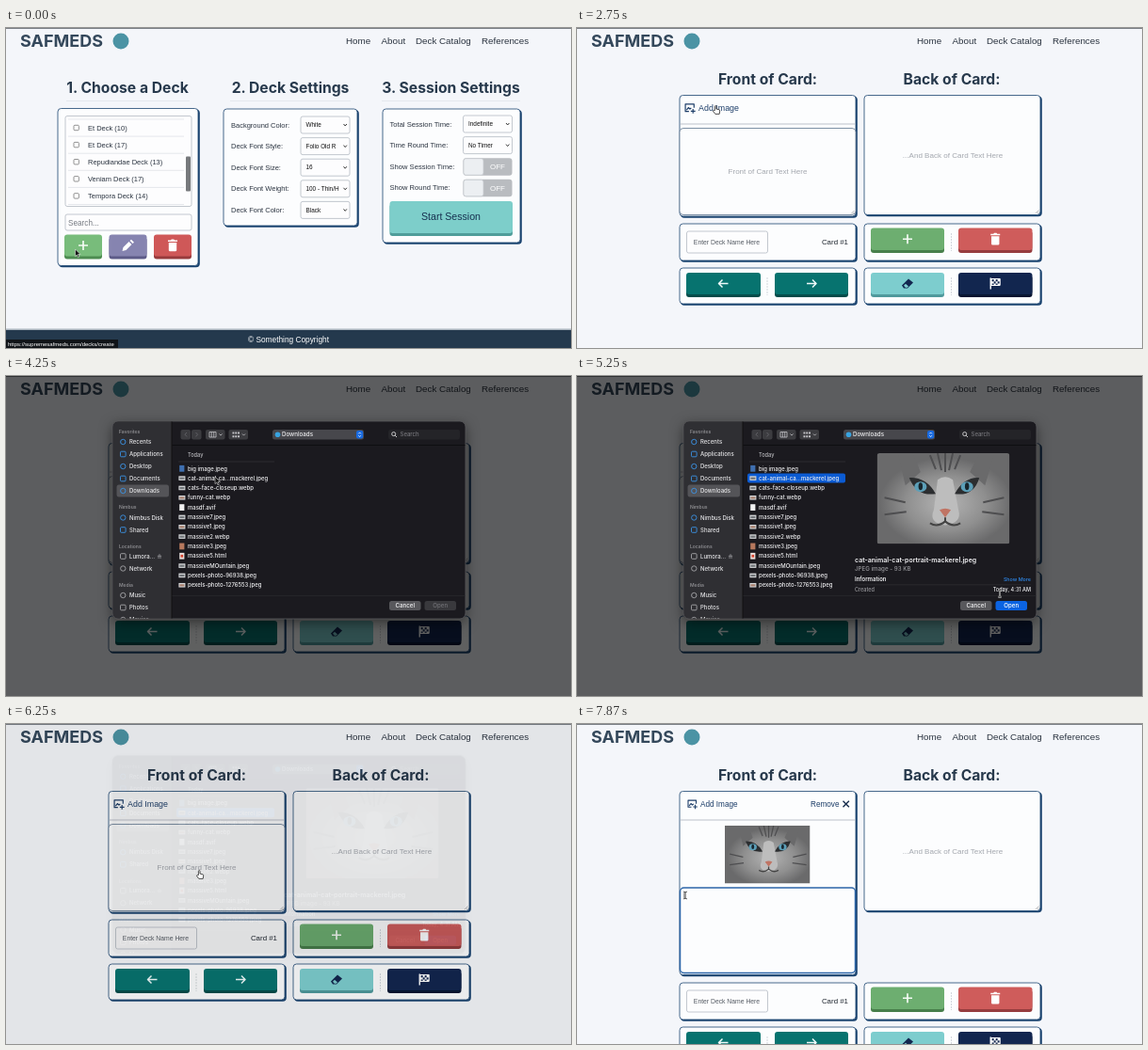
An HTML page that plays this animation: 600x340 px, repeating every 8000 ms.

```html
<!DOCTYPE html>
<html lang="en">
<head>
<meta charset="utf-8">
<title>Flash card deck</title>
<style>
  html, body { margin: 0; width: 100%; height: 100%; overflow: hidden; background: #f4f6fa; }
  svg { display: block; width: 600px; height: 340px; }
  svg svg { width: auto; height: auto; }
  text { font-family: "Liberation Sans", Arial, sans-serif; white-space: pre; }
  .ui text { font-family: Inter, sans-serif; font-weight: 500; }
  .ui .bold { font-weight: 600; }
  .head { font-family: Inter, sans-serif; font-weight: 700; }
  .window { filter: drop-shadow(0 4px 7px rgba(0, 0, 0, .5)); }
</style>
</head>
<body>
<svg id="stage" viewBox="0 0 600 340" xmlns="http://www.w3.org/2000/svg"></svg>
<script>
const LOOP = 8000;
const NAVY = '#1b4470', INK = '#27394c', TEXT = '#2b3440', SOFT = '#a3a7ae';

// Markup helpers
const rect = (x, y, w, h, fill, more = '') =>
  `<rect x="${x}" y="${y}" width="${w}" height="${h}" fill="${fill}" ${more}/>`;
const text = (x, y, s, size, fill = TEXT, more = '') =>
  `<text x="${x}" y="${y}" font-size="${size}" fill="${fill}" ${more}>${s}</text>`;
const mid = 'text-anchor="middle"', end = 'text-anchor="end"', bold = 'class="bold"';
const heading = (x, y, s) => text(x, y, s, 15.7, INK, `class="head" ${mid}`);
const line = (x1, y1, x2, y2, color, w = 1, more = '') =>
  `<path d="M${x1} ${y1}L${x2} ${y2}" stroke="${color}" stroke-width="${w}" ${more}/>`;
const group = (s, more = '') => `<g ${more}>${s}</g>`;
const at = (x, y, s) => group(s, `transform="translate(${x} ${y})"`);
const stroke = (d, color, w = 1) =>
  `<path d="${d}" fill="none" stroke="${color}" stroke-width="${w}" stroke-linejoin="round"/>`;
const fill = (d, color, more = '') => `<path d="${d}" fill="${color}" ${more}/>`;

const card = (x, y, w, h) =>
  rect(x + 1, y + 1, w + .8, h + .8, NAVY, 'rx="4"') +
  rect(x, y, w, h, '#fcfdfe', `rx="3.5" stroke="${NAVY}" stroke-width=".8"`);
const field = (x, y, w, h, color = '#b4bac3') =>
  rect(x, y, w, h, '#fdfdfe', `rx="2" stroke="${color}" stroke-width=".8"`);
const button = (x, y, w, h, face, edge, icon = '') =>
  rect(x, y + 3, w, h - 3, edge, 'rx="3"') + rect(x, y, w, h - 3, face, 'rx="3"') +
  at(x + w / 2, y + h / 2 - 1.5, icon);
const select = (x, y, w, s) =>
  field(x, y, w, 18) + text(x + 5.5, y + 11.2, s, 6.4, '#111') +
  stroke(`M${x + w - 6.5} ${y + 8}l1.7 2 1.7 -2`, '#222', .9);

// Icons, drawn around 0,0
const icons = {
  plus: stroke('M-5 0H5M0 -5V5', '#f4fbf4', 1.7),
  pencil: fill('M-6 6l1 -4 6 -6 3 3 -6 6zM2 -5l1.5 -1.3 3 3L5 -2z', '#fff'),
  trash: fill('M-5 -5.5h3l.7 -1h2.6l.7 1h3V-4H-5zM-4.2 -3H4.2V5a1.3 1.3 0 0 1 -1.3 1.3H-2.9A1.3 1.3 0 0 1 -4.2 5z', '#fff'),
  left: stroke('M5 0H-5M-1 -4L-5 0L-1 4', '#eefafa', 1.5),
  right: stroke('M-5 0H5M1 -4L5 0L1 4', '#eefafa', 1.5),
  eraser: fill('M-6 2L1 -5L6 -1L0 5H-4z', '#12264f') + fill('M-4 2.2l2 -2 3 2.8 -1.2 1.2h-2z', '#7fcfd0'),
  flag: stroke('M-5 -6V6', '#fff', 1.4) + rect(-5, -5.6, 10.5, 8, '#fff', 'rx=".8"') +
    [0, 1, 2, 3].map(i => rect(-3.6 + i * 2, i % 2 ? -2.2 : -4.4, 2, 2.2, '#12264f') +
      (i % 2 ? '' : rect(-3.6 + i * 2, 0, 2, 1.4, '#12264f'))).join(''),
};

const photo = (x, y, w, h, id) => `<svg x="${x}" y="${y}" width="${w}" height="${h}" style="width:${w}px;height:${h}px" viewBox="0 0 140 96" preserveAspectRatio="none">
  <defs><radialGradient id="${id}" cx=".52" cy=".55"><stop offset="0" stop-color="#b4b4b4"/><stop offset=".6" stop-color="#8f8f8f"/><stop offset="1" stop-color="#6a6a6b"/></radialGradient></defs>
  ${rect(0, 0, 140, 96, `url(#${id})`)}
  ${fill('M22 0H38L46 20L30 34zM124 0H108L98 20L114 34z', '#6a6a6b')}
  ${stroke('M64 0L68 18M72 0V20M80 0L76 18M56 2L62 17M88 2L82 17M30 52L8 47M31 62L8 65M112 52L134 47M111 62L134 65', '#4e4e50', 2)}
  ${fill('M64 28Q72 22 80 28L86 60Q90 74 72 76Q54 74 60 60z', '#bdbdbd')}
  ${fill('M34 26Q52 25 62 43Q42 46 34 26zM108 26Q92 25 82 43Q102 46 108 26z', '#2c2e30')}
  ${[46, 95].map(cx => `<ellipse cx="${cx}" cy="35.5" rx="6.5" ry="5.5" fill="#5c9fb8"/><ellipse cx="${cx}" cy="35" rx="2.2" ry="4" fill="#17252c"/>`).join('')}
  ${fill('M66 60Q72 57 78 60L72 68z', '#c07464')}
  ${stroke('M72 68V72Q64 79 56 74M72 72Q80 79 88 74', '#444', 2)}
</svg>`;

const header =
  rect(0, 0, 600, 1, '#7b8087') +
  text(15, 20, 'SAFMEDS', 18, '#34485b', 'class="head"') +
  '<circle cx="122" cy="14" r="8.5" fill="#4b93a4"/>' +
  [[361, 'Home'], [398.5, 'About'], [435, 'Deck Catalog'], [505, 'References']]
    .map(([x, s]) => text(x, 17, s, 9.8)).join('');

function deckPage() {
  let s = heading(129, 68.5, '1. Choose a Deck') + heading(302, 69, '2. Deck Settings') +
    heading(472.5, 68.5, '3. Session Settings');
  [[64, 195], [238, 366], [399, 546]].forEach(([a, b]) => s += line(a, 77.5, b, 77.5, '#dfe3e9', .7));

  s += card(55, 85.5, 149, 167) + field(63, 93.5, 134, 96);
  ['Et Deck (10)', 'Et Deck (17)', 'Repudiandae Deck (13)', 'Veniam Deck (17)', 'Tempora Deck (14)'].forEach((name, i) => {
    const y = 106 + i * 18.1;
    s += line(66, y - 9, 189, y - 9, '#dcdfe4', .7) +
      rect(72, y - 2.7, 5.4, 5.4, '#fff', 'rx="1" stroke="#777" stroke-width=".8"') +
      text(87, y + 2.6, name, 7.5);
  });
  s += line(66, 187.5, 189, 187.5, '#dcdfe4', .7) + rect(191, 136.5, 5, 37, '#77797c', 'rx="1"');
  s += field(63, 198, 134, 17) + text(66, 209.5, 'Search...', 8.2, '#757a81');
  s += button(62, 219.5, 40, 26, '#78bc7b', '#4d8c51', icons.plus) +
    button(109.5, 219.5, 40, 26, '#8684b0', '#5d5b88', icons.pencil) +
    button(157, 219.5, 40, 26, '#cf5858', '#983b3d', icons.trash);

  s += card(231, 86, 142, 124);
  [['Background Color:', 'White'], ['Deck Font Style:', 'Folio Old R'], ['Deck Font Size:', '16'],
   ['Deck Font Weight:', '100 - Thin/H'], ['Deck Font Color:', 'Black']].forEach(([a, b], i) => {
    const y = 103 + i * 22.6;
    s += text(239, y + 2.6, a, 7.5) + select(313, y - 9, 52, b);
  });

  s += card(400, 86, 146, 142);
  ['Total Session Time:', 'Time Round Time:', 'Show Session Time:', 'Show Round Time:'].forEach((a, i) => {
    const y = 102 + i * 22.6;
    s += text(407.5, y + 2.6, a, 7.6);
    s += i < 2 ? select(485.5, y - 9, 52, ['Indefinite', 'No Timer'][i]) :
      rect(485.5, y - 9, 52, 18.5, '#b9bcc0', 'rx="3"') +
      rect(486, y - 8.5, 21, 17.5, '#eceff2', 'rx="2.5" stroke="#c6cace" stroke-width=".7"') +
      text(522, y + 3.2, 'OFF', 8, '#fff', mid);
  });
  s += button(407.5, 184, 130.5, 37, '#7dceca', '#4f9d9a') + text(472.5, 204, 'Start Session', 10.6, '#173150', mid);

  s += rect(0, 319.5, 600, 2, '#aab3bd') + rect(0, 321, 600, 19, '#24394d') +
    text(300, 334, '© Something Copyright', 8.3, '#fff', mid);
  return s + rect(0, 331, 119, 9, '#101418') + text(2, 338, 'https://supremesafmeds.com/decks/create', 6, '#fff');
}

const addImage = group(
  stroke('M4.5 8H1V.8H9.5V4.5M2.2 6.5L4 4.2L5.5 5.7L6.8 4.5M8.5 5.5V10M6.3 7.7H10.8', '#1c3d68', 1.1) +
  text(14, 7.6, 'Add Image', 8.2, '#1c3d68'), 'id="add"');

function cardPage() {
  const split = (x, y) => line(x, y + 10, x, y + 29, '#cdd2d9', .9, 'stroke-dasharray="2 1"');
  const lower = card(109, 208, 187, 39) + card(305, 208, 187, 39) + card(109, 255, 187, 38) + card(305, 255, 187, 38) +
    field(116.5, 216, 86, 23) + text(159, 230, 'Enter Deck Name Here', 6.8, '#555b63', mid) +
    text(288, 230, 'Card #1', 7.9, '#1d242d', end) +
    button(312, 212.5, 78, 26.5, '#6dae70', '#477f4b', icons.plus) +
    button(405, 212.5, 78.5, 26.5, '#cf5c5b', '#963c3e', icons.trash) +
    button(116, 260, 79, 26, '#07736f', '#044c4a', icons.left) +
    button(210, 260, 78, 26, '#07736f', '#044c4a', icons.right) +
    button(312, 260, 78, 26, '#7dcdce', '#4f999c', icons.eraser) +
    button(405, 260, 78.5, 26, '#12264f', '#081531', icons.flag) +
    split(397.5, 208) + split(202, 255) + split(397.5, 255);
  const box = (x, y, w, h, color, sw) => rect(x, y, w, h, '#fcfdfe', `rx="4" stroke="${color}" stroke-width="${sw}"`);
  return heading(202.5, 60, 'Front of Card:') + heading(398, 60, 'Back of Card:') +
    group(card(109, 71.5, 187, 128.5), 'id="plain"') +
    group(card(109, 71.5, 187, 195) + text(248, 88, 'Remove', 8.2, '#1c3d68') +
      stroke('M282.5 81.8l6.4 6.4m0 -6.4l-6.4 6.4', '#172c4c', 1.4) +
      photo(157, 108, 90.5, 61.5, 'furSmall'), 'id="filled"') +
    line(109.5, 102, 295.5, 102, '#aab2bc', .8) + addImage +
    group(box(109, 106.5, 187, 92, '#70849b', .9) +
      text(202.5, 155, 'Front of Card Text Here', 8.05, SOFT, mid) +
      stroke('M291 197.5l3.5 -3.5M293 197.5l1.5 -1.5', '#888', .6), 'id="area"') +
    group(box(109.5, 174, 186, 90.5, '#2c66a8', 1.5) + line(114, 178.5, 114, 186, '#222', .8), 'id="focus"') +
    card(305, 71.5, 187, 127) + text(399, 138, '...And Back of Card Text Here', 8.05, SOFT, mid) +
    stroke('M487 197l3.5 -3.5M489 197l1.5 -1.5', '#888', .6) +
    group(lower, 'id="lower"');
}

function dialog() {
  const side = (y, s, i, color = '#3b94e6') =>
    (i % 2 ? rect(121.5, y - 2.8, 5.6, 5.6, 'none', `rx="1" stroke="${color}" stroke-width=".9"`)
           : `<circle cx="124.3" cy="${y}" r="2.7" fill="none" stroke="${color}" stroke-width=".9"/>`) +
    text(131, y + 2.2, s, 6, '#e6e6e8');
  const label = (y, s) => text(120, y + 1.8, s, 5, '#8b8b8f', bold);
  const GREY = '#a5a5a9';
  const panel = 'M176 48.4V257.6H119a5.6 5.6 0 0 1 -5.6 -5.6V54a5.6 5.6 0 0 1 5.6 -5.6z';
  let s = rect(113, 48, 375, 210, '#1b1a1f', 'rx="6" class="window"') +
    fill(panel, '#2f2f33') + fill(panel, '#fff', 'id="tint"') +
    rect(113, 48, 375, 210, 'none', 'rx="6" stroke="#5b5b5f" stroke-width=".8"') +
    line(176, 48.4, 176, 257.6, '#0d0d0f', .8);
  s += rect(117.5, 115.5, 55.5, 13, '#545458', 'rx="2.5"') + label(59, 'Favorites');
  ['Recents', 'Applications', 'Desktop', 'Documents', 'Downloads'].forEach((n, i) => s += side(70 + i * 13, n, i));
  s += label(139.5, 'Nimbus') + side(150.5, 'Nimbus Disk', 0) + side(163.5, 'Shared', 1) +
    label(181, 'Locations') + side(191.5, 'Lumora...', 1, GREY) + stroke('M161 193h4M161.3 191.5l1.7 -2 1.7 2z', GREY, .7) +
    group(side(204.5, 'Network', 0, GREY), 'id="network"');
  const media = ['Music', 'Photos', 'Movies'].map((n, i) => side(233 + i * 13, n, i, GREY)).join('');
  s += group(group(label(222.5, 'Media') + media, 'id="media"'), 'clip-path="url(#panel)"');

  s += rect(185.5, 57, 10.5, 10.5, '#3c3c40', 'rx="2"') + rect(197, 57, 10.5, 10.5, '#3c3c40', 'rx="2"') +
    stroke('M192 60l-2 2.2 2 2.2M201.5 60l2 2.2 -2 2.2', '#65656a', .9);
  [212, 236.5].forEach((x, i) => s += rect(x, 57, 20.5, 10.5, '#3c3c40', 'rx="2"') +
    (i ? line(x + 4, 60.6, x + 11.5, 60.6, '#c4c4c8', 2, 'stroke-dasharray="1.9 .9"') + line(x + 4, 64.2, x + 11.5, 64.2, '#c4c4c8', 2, 'stroke-dasharray="1.9 .9"')
       : stroke(`M${x + 4} 59.5h7v5.5h-7zm2.3 0v5.5m2.4 -5.5v5.5`, '#c4c4c8', .8)) +
    stroke(`M${x + 14.5} 61.5l1.5 1.6 1.5 -1.6`, '#c4c4c8', .8));
  s += rect(283, 57, 97, 10.5, '#47474c', 'rx="2.5"') + '<circle cx="288.5" cy="62.2" r="2.8" fill="#38a3e0"/>' +
    text(293, 64.4, 'Downloads', 6.2, '#f0f0f2') + rect(372, 58, 7.2, 8.5, '#1769e0', 'rx="2"') +
    stroke('M374.3 61.4l1.3 -1.4 1.3 1.4M374.3 63.2l1.3 1.4 1.3 -1.4', '#fff', .8);
  s += rect(406, 57, 76, 10.5, '#242428', 'rx="2.5"') +
    '<circle cx="411.7" cy="61.6" r="2" fill="none" stroke="#ddd" stroke-width=".9"/>' + line(413.2, 63.2, 415, 65, '#ddd', .9) +
    text(418.5, 64.4, 'Search', 6, '#77777c');
  s += line(176.5, 73.5, 487.5, 73.5, '#0c0c0e', .8) + text(193, 86.3, 'Today', 5.6, '#bdbdc1') +
    line(183, 91, 285, 91, '#37373b', .6);
  s += rect(181, 103.4, 104, 10.2, '#0b5bd3', 'rx="2" id="picked"');
  ['big image.jpeg', 'cat-animal-ca...mackerel.jpeg', 'cats-face-closeup.webp', 'funny-cat.webp', 'masdf.avif',
   'massive7.jpeg', 'massive1.jpeg', 'massive2.webp', 'massive3.jpeg', 'massive5.html', 'massiveMOuntain.jpeg',
   'pexels-photo-96938.jpeg', 'pexels-photo-1276553.jpeg'].forEach((name, i) => {
    const y = 98.3 + i * 10.33;
    const tall = { 0: '#3f6fb0', 4: '#f2f2f2', 8: '#b6785d', 9: '#e9dfdc' }[i];
    s += (tall ? rect(184.2, y - 3.4, 5.2, 6.8, tall)
               : rect(183.4, y - 2.3, 7, 4.6, '#d3d5d7') + rect(184.4, y - 1, 5, 2.2, i % 3 ? '#717579' : '#a67e6c')) +
      (i === 9 ? rect(185.5, y - 1.4, 2.6, 2.8, '#d8442f') : '') + text(193, y + 2.2, name, 5.95, '#f0f0f2');
  });
  s += group(`<g clip-path="url(#round)">${photo(318.5, 82, 141, 96.5, 'furLarge')}</g>` +
    text(295, 197.8, 'cat-animal-cat-portrait-mackerel.jpeg', 7, '#f2f2f4', bold) +
    text(295, 207.4, 'JPEG image - 93 KB', 6.2, '#97979b') +
    text(295, 218.4, 'Information', 6, '#f2f2f4', bold) + text(482, 218.4, 'Show More', 5.4, '#2f8cf0', end) +
    line(295, 221.8, 482, 221.8, '#333337', .6) +
    text(295, 228.8, 'Created', 5.5, '#97979b') + text(482, 228.8, 'Today, 4:31 AM', 5.5, '#f2f2f4', end), 'id="preview"');
  s += line(176.5, 233.5, 487.5, 233.5, '#2a2a2e', .7) +
    rect(407, 239, 33.5, 10, '#58585c', 'rx="2.5"') + text(423.7, 246.3, 'Cancel', 6.2, '#f4f4f6', mid) +
    rect(444.5, 239, 33.5, 10, '#39393d', 'rx="2.5" id="open"') + text(461.2, 246.3, 'Open', 6.2, '#707075', mid + ' id="openText"');
  return s;
}

const ARROW = 'M0 0V7.6L1.8 6L3 8.8L4.3 8.2L3.1 5.5H5.5z';
const BEAM = 'M-1.8 -3.8Q0 -3.8 0 -2.6Q0 -3.8 1.8 -3.8M0 -2.6V2.6M-1.8 3.8Q0 3.8 0 2.6Q0 3.8 1.8 3.8';
const HAND = 'M-1.6 .5V-3.6a.8 .8 0 0 1 1.6 0V-1l3 .8q.8 .3 .7 1.3l-.5 3.3H-1.2L-3.6 1.2q.6 -1 2 -.7z';
const pointers =
  group(fill(ARROW, '#111') + stroke(ARROW, '#fff', .5), 'id="arrow"') +
  group(stroke(BEAM, '#fff', 1.6) + stroke(BEAM, '#222', .9), 'id="beam"') +
  group(fill(HAND, '#fff') + stroke(HAND, '#222', .8), 'id="hand"');

document.getElementById('stage').innerHTML =
  `<defs><clipPath id="round">${rect(318.5, 82, 141, 96.5, '#000', 'rx="3"')}</clipPath>
  <clipPath id="panel">${rect(113, 48, 63, 209.5, '#000')}</clipPath></defs>` +
  rect(0, 0, 600, 340, '#f4f6fa') + group(deckPage(), 'id="decks"') + group(cardPage(), 'id="cards"') + header +
  rect(0, 0, 600, 340, '#000', 'id="dim"') + group(dialog(), 'id="dialog" class="ui"') + group(pointers, 'id="pointer"');

const el = {};
document.querySelectorAll('#stage [id]').forEach(e => el[e.id] = e);
const show = (e, on) => e.setAttribute('display', on ? 'inline' : 'none');
const move = (e, x, y, k = 1) => e.setAttribute('transform', `translate(${x} ${y}) scale(${k})`);
const ramp = (t, a, b) => Math.min(1, Math.max(0, (t - a) / (b - a)));
const ease = p => p * p * (3 - 2 * p);

// time, x, y
const path = [[0, 73.5, 235], [950, 73.5, 235], [1370, 116.5, 153], [1900, 116.5, 153], [2450, 148, 87], [3250, 148, 87],
  [3620, 206, 105], [4250, 222, 107], [4750, 224, 108], [5250, 449, 231], [5600, 461, 244], [5950, 461, 244],
  [6250, 206, 160], [6900, 206, 160], [7450, 115, 182], [8000, 115, 182]];
// time from which each pointer shape holds
const shapes = [[0, 'arrow'], [1100, 'beam'], [2250, 'hand'], [3350, 'arrow'], [5150, 'beam'], [5450, 'arrow'], [6100, 'hand'], [6950, 'beam']];

function pointerAt(t) {
  const i = path.findIndex((p, n) => n && t <= p[0]);
  const a = path[i - 1], b = path[i], p = ease(ramp(t, a[0], b[0]));
  return [a[1] + (b[1] - a[1]) * p, a[2] + (b[2] - a[2]) * p];
}

function draw(t) {
  const filled = t >= 6900, focused = t >= 7500;
  show(el.decks, t < 1000);
  show(el.cards, t >= 1000);
  show(el.plain, !filled);
  show(el.filled, filled);
  show(el.area, !focused);
  show(el.focus, focused);
  move(el.area, 0, filled ? 67 : 0);
  move(el.lower, 0, filled ? 67 : 0);
  const hover = t >= 2300 && t < 6800;
  move(el.add, hover ? 114 : 117, hover ? 80 : 80.3, hover ? 1.08 : 1);

  const enter = ramp(t, 3250, 4000), leave = ramp(t, 5980, 6265);
  el.dim.setAttribute('opacity', .62 * enter * (1 - ramp(t, 5980, 6285)));
  show(el.dialog, t >= 3250 && leave < 1);
  el.dialog.setAttribute('opacity', ramp(t, 3250, 3500) * (1 - leave));
  el.tint.setAttribute('opacity', .2 * (1 - enter));
  move(el.dialog, 0, -15 * (1 - enter) - 15 * leave);
  const network = t >= 4000, picked = t >= 4620;
  show(el.network, network);
  move(el.media, 0, network ? 0 : -13);
  show(el.picked, picked);
  show(el.preview, picked);
  el.open.setAttribute('fill', picked ? '#0b63e2' : '#39393d');
  el.openText.setAttribute('fill', picked ? '#fff' : '#707075');

  move(el.pointer, ...pointerAt(t));
  const shape = shapes.filter(s => s[0] <= t).pop()[1];
  ['arrow', 'beam', 'hand'].forEach(n => show(el[n], n === shape));
}

const start = performance.now();
function tick() {
  draw((performance.now() - start) % LOOP);
  requestAnimationFrame(tick);
}
tick();
</script>
</body>
</html>
```
